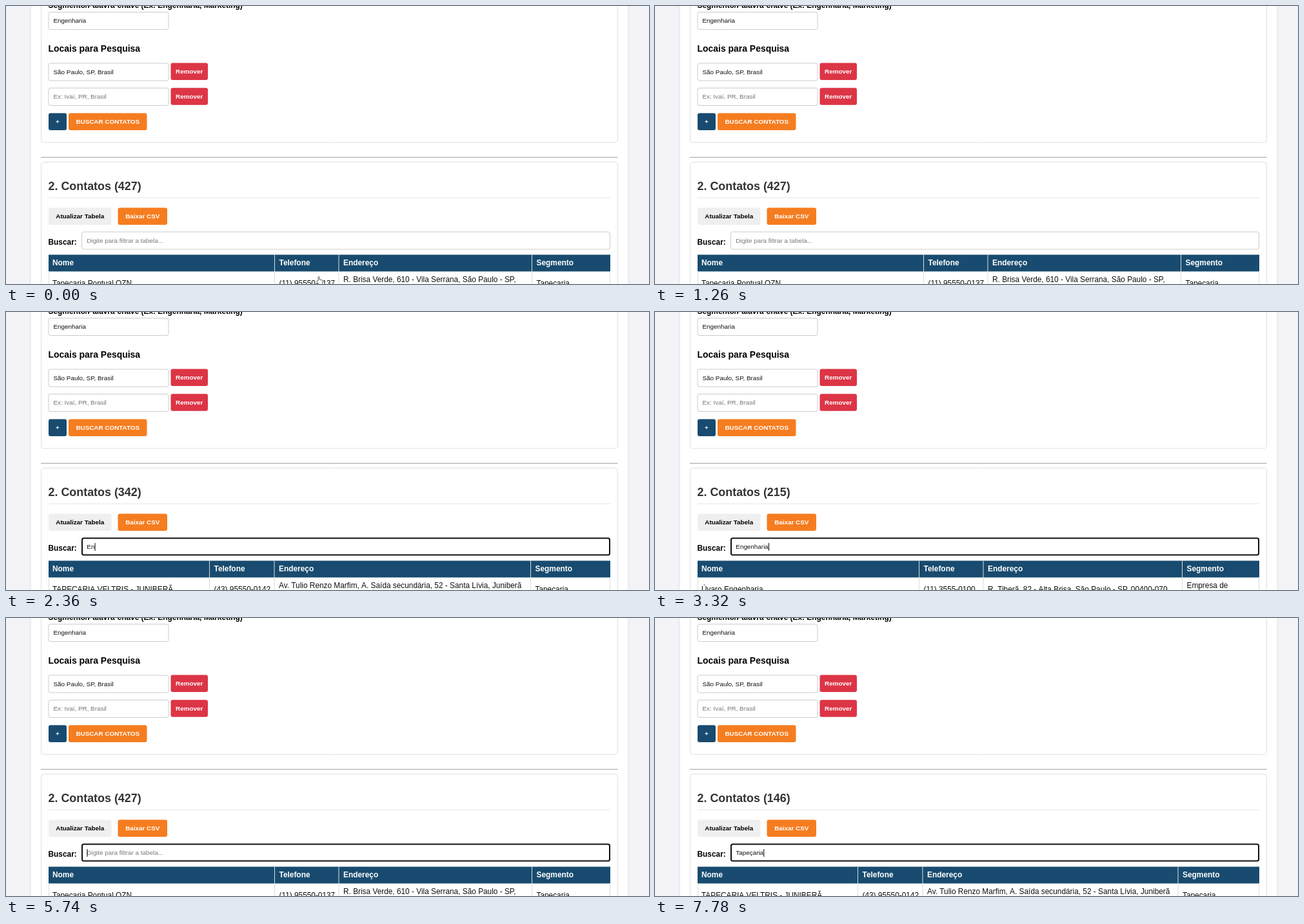
Write an HTML page with a canvas that moves like this. It is 997x432 px and loops after 8000 ms.

```html
<!DOCTYPE html>
<html lang="pt-BR">
<head>
<meta charset="utf-8">
<title>Contatos</title>
<style>
  html, body { margin: 0; width: 100%; height: 100%; overflow: hidden; background: #f4f3f8; }
  canvas { display: block; }
</style>
</head>
<body>
<canvas id="stage" width="997" height="432"></canvas>
<script>
const ctx = document.getElementById('stage').getContext('2d');
const LOOP = 8000, FOCUS_AT = 1340;
const NAVY = '#184b6f', ORANGE = '#f57d20', RED = '#dc3546';

// Search field contents: [time, text]
const edits = [[FOCUS_AT, '']];
const addEdits = (word, times) => times.forEach((t, i) => edits.push([t, word.slice(0, i + 1)]));
addEdits('Engenharia', [1500, 2160, 2500, 2660, 2840, 2900, 3080, 3160, 3240, 3320]);
[4600, 4740, 4860, 5100, 5280, 5360, 5440, 5540, 5640, 5740]
  .forEach((t, i) => edits.push([t, 'Engenharia'.slice(0, 9 - i)]));
addEdits('Tapeçaria', [6160, 6340, 6760, 7160, 7260, 7420, 7620, 7700, 7780]);

const counts = { En: 342, Eng: 226, Enge: 226, Engen: 221, Engenh: 220, T: 418, Ta: 336, Tap: 162, Tape: 150 };
function countFor(query) {
  if (query in counts) return counts[query];
  if (query.startsWith('Engenha')) return 215;
  return query.startsWith('Tapeç') ? 146 : 427;
}

// First table row for each kind of result; cols are the column dividers
const allRows = {
  cols: [416.5, 516, 815.5], name: 'Tapecaria Pontual QZN', phone: '(11) 95550-0137',
  address: 'R. Brisa Verde, 610 - Vila Serrana, São Paulo - SP,', segment: 'Tapeçaria'
};
const upholstery = {
  cols: [314.5, 415, 811], name: 'TAPECARIA VELTRIS - JUNIBERÃ', phone: '(43) 95550-0142',
  address: 'Av. Tulio Renzo Marfim, A. Saída secundária, 52 - Santa Lívia, Juniberã', segment: 'Tapeçaria'
};
const broadMatch = { ...upholstery, cols: [315.5, 416, 813.5] };
const engineering = {
  cols: [409.5, 509, 817.5], name: 'Úvaro Engenharia', phone: '(11) 3555-0100',
  address: 'R. Tiberã, 82 - Alta Brisa, São Paulo - SP, 00400-070', segment: 'Empresa de'
};
function rowFor(query) {
  if (!query) return allRows;
  if (query.startsWith('Eng')) return engineering;
  return query.startsWith('Ta') ? upholstery : broadMatch;
}

function text(str, x, y, size, color = '#111', weight = 'normal', align = 'left') {
  ctx.font = `${weight} ${size}px "Liberation Sans", Arial, sans-serif`;
  ctx.fillStyle = color;
  ctx.textAlign = align;
  ctx.fillText(str, x, y);
}
const bold = (str, x, y, size, color = '#000', align) => text(str, x, y, size, color, 'bold', align);

function box(x, y, w, h, radius, fill, stroke, lineWidth = 1) {
  ctx.beginPath();
  ctx.roundRect(x, y, w, h, radius);
  if (fill) { ctx.fillStyle = fill; ctx.fill(); }
  if (stroke) { ctx.strokeStyle = stroke; ctx.lineWidth = lineWidth; ctx.stroke(); }
}
function rect(x, y, w, h, color) {
  ctx.fillStyle = color;
  ctx.fillRect(x, y, w, h);
}
function button(label, x, y, w, fill, color = '#fff') {
  box(x, y, w, 26.5, 3, fill);
  bold(label, x + w / 2, y + 16.7, 9.9, color, 'center');
}
function field(value, y, color) {
  box(66, y, 186, 27, 3, '#fff', '#ccc');
  text(value, 73.5, y + 16.8, 9.9, color);
}

function drawForm() {
  rect(0, 0, 997, 432, '#f4f3f8');
  ctx.shadowColor = 'rgba(0,0,0,.08)';
  ctx.shadowBlur = 6;
  rect(39, -20, 925, 480, '#fff');
  ctx.shadowBlur = 0;

  box(54.5, -20, 894, 232, 4, null, '#e0e0e0');
  bold('Segmento/Palavra-chave (Ex: Engenharia, Marketing)', 65.5, 2.5, 11.9);
  field('Engenharia', 9.5);
  bold('Locais para Pesquisa', 65.5, 71, 13.95);
  field('São Paulo, SP, Brasil', 89);
  field('Ex: Ivaí, PR, Brasil', 127.5, '#777');
  button('Remover', 255.5, 88.5, 57.5, RED);
  button('Remover', 255.5, 127.3, 57.5, RED);
  button('+', 66, 166.5, 28, NAVY);
  button('BUSCAR CONTATOS', 97, 166.5, 121.5, ORANGE);
  rect(54, 234.5, 894.5, 1.5, '#bbb');
}

function drawSearch(query, focused, caretOn) {
  bold('Buscar:', 65.5, 370.5, 11.9);
  if (focused) box(118, 351.5, 818, 26, 2.5, '#fff', '#101010', 2);
  else box(117.5, 351, 819, 27, 3, '#fff', '#ccc');
  text(query || 'Digite para filtrar a tabela...', 125.3, 368, 9.9, query ? '#111' : '#777');
  if (caretOn) {
    const width = query ? ctx.measureText(query).width : 0;
    rect(125.5 + width, 359, 1, 12, '#000');
  }
}

function drawTable({ cols, name, phone, address, segment }) {
  rect(66, 386.5, 871, 26, NAVY);
  const starts = [72, ...cols.map(x => x + 7)];
  ['Nome', 'Telefone', 'Endereço', 'Segmento'].forEach((title, i) =>
    bold(title, starts[i], 403, 11.9, '#fff'));
  [66, ...cols, 936].forEach((x, i) => {
    const inner = i > 0 && i < 4;
    rect(x - (inner ? .5 : 0), inner ? 386.5 : 412.5, 1, 46, '#ddd');
  });
  // Cells with two lines of text sit higher
  const upper = 429.3, middle = 435.3;
  text(name, starts[0], middle, 11.85);
  text(phone, starts[1], middle, 11.85);
  text(address, starts[2], segment === 'Empresa de' ? middle : upper, 11.85);
  text(segment, starts[3], segment === 'Empresa de' ? upper : middle, 11.85);
}

function drawHand(x, y) {
  ctx.save();
  ctx.translate(x, y);
  const hand = new Path2D('M2 7V1.2Q3 0 4 1.2V5L8 6Q9 6.3 9 7.5V10L8 13H3L0 8.5Q0 6.7 2 7Z');
  ctx.fillStyle = '#fff';
  ctx.fill(hand);
  ctx.strokeStyle = '#333';
  ctx.lineWidth = .8;
  ctx.stroke(hand);
  ctx.restore();
}

function draw(t) {
  const [since, query] = edits.findLast(([time]) => time <= t) || [0, ''];
  const focused = t >= FOCUS_AT;
  const erasing = t >= 5100 && t < 5740;
  const caretOn = focused && !erasing && (t - since) % 1000 < 480;

  drawForm();
  box(54.5, 242.5, 894, 220, 4, null, '#e0e0e0');
  bold(`2. Contatos (${countFor(query)})`, 65.5, 285.5, 17.9, '#333');
  rect(66, 297.5, 871, 1, '#e4e4e4');
  button('Atualizar Tabela', 66, 313.5, 97.5, '#efefef', '#000');
  button('Baixar CSV', 173.5, 313.5, 76.5, ORANGE);
  drawSearch(query, focused, caretOn);
  drawTable(rowFor(query));
  if (t < 120) drawHand(482, 420);
}

const start = performance.now();
function tick() {
  draw((performance.now() - start) % LOOP);
  requestAnimationFrame(tick);
}
tick();
</script>
</body>
</html>
```
